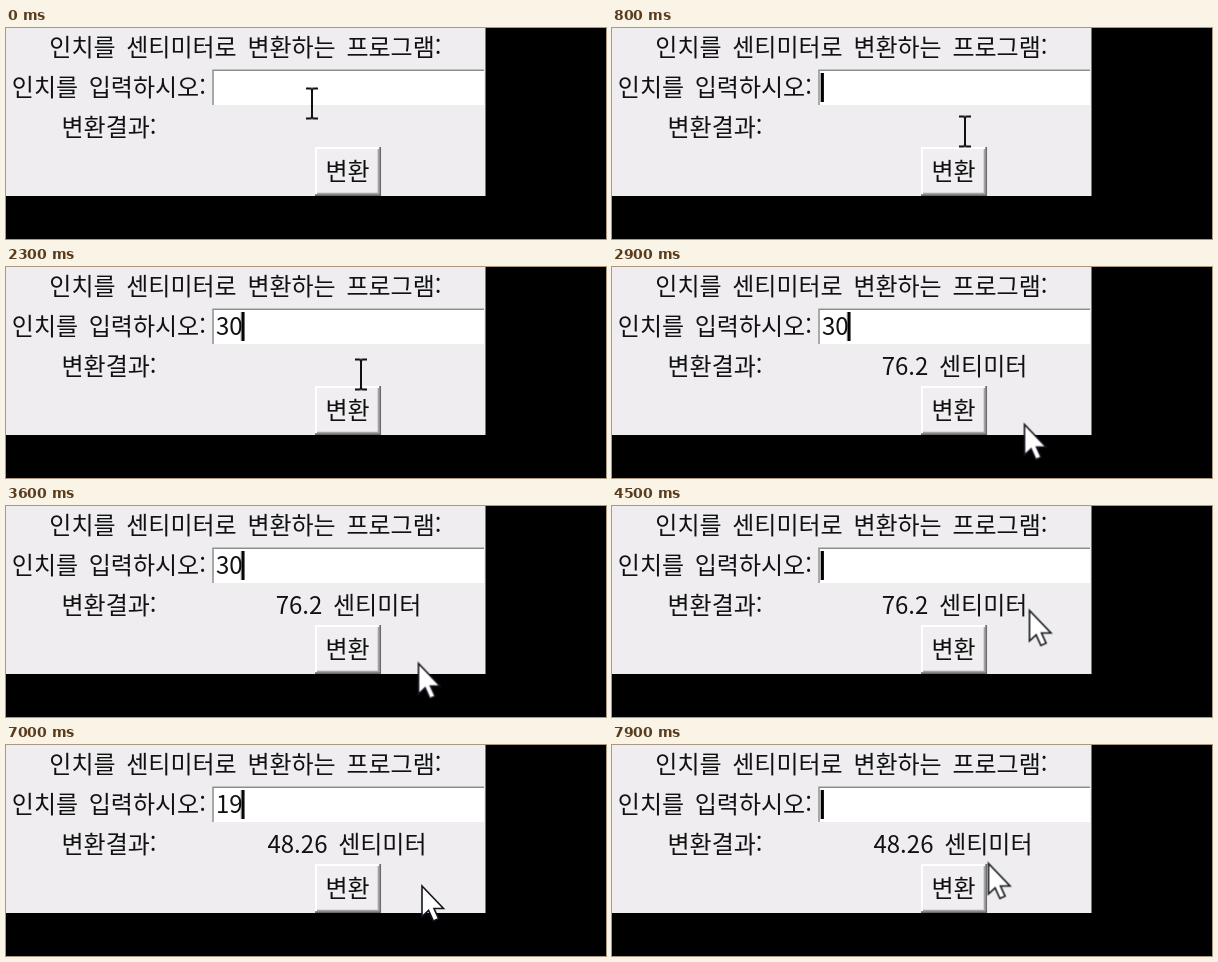
Recreate the animation shown at these times as an HTML page. Size 600x211 px, loop 8000 ms.

```html
<!DOCTYPE html>
<html lang="ko">
<head>
<meta charset="utf-8">
<title>단위 변환</title>
<style>
html, body { margin: 0; width: 100%; height: 100%; overflow: hidden; background: #000; }
svg { display: block; width: 600px; height: 211px; }
text {
  font: 24px "Noto Sans CJK KR", "Noto Sans CJK", "Noto Sans CJK JP", sans-serif;
  word-spacing: 4px;
  fill: #111;
  white-space: pre;
}
.mid { text-anchor: middle; }

/* Everything shares one 8 s clock; 1% = 80 ms */
.anim { animation: 8s step-end infinite; }
.three { animation-name: three; }
.zero { animation-name: zero; }
.one { animation-name: one; }
.nine { animation-name: nine; }
.first { animation-name: first; }
.second { animation-name: second; }
.caret { animation-name: caret; }
.beam { animation-name: beam; }
.arrow { animation-name: arrow; }
.pointer { animation-name: move; }

@keyframes three {
  0%, 53.75%, 100% { visibility: hidden; }
  18.75% { visibility: visible; }
}
@keyframes zero {
  0%, 51.25%, 100% { visibility: hidden; }
  22.5% { visibility: visible; }
}
@keyframes one {
  0%, 91.25%, 100% { visibility: hidden; }
  65% { visibility: visible; }
}
@keyframes nine {
  0%, 88.75%, 100% { visibility: hidden; }
  68.75% { visibility: visible; }
}
@keyframes first {
  0%, 77.5%, 100% { visibility: hidden; }
  31.25% { visibility: visible; }
}
@keyframes second {
  0% { visibility: hidden; }
  77.5%, 100% { visibility: visible; }
}
@keyframes caret {
  0% { visibility: hidden; transform: translate(0, 0); }
  5%, 53.75%, 91.25%, 100% { visibility: visible; transform: translate(0, 0); }
  18.75%, 51.25%, 65%, 88.75% { visibility: visible; transform: translate(13.3px, 0); }
  22.5%, 68.75% { visibility: visible; transform: translate(26.6px, 0); }
}
@keyframes beam {
  0% { visibility: visible; }
  30%, 100% { visibility: hidden; }
}
@keyframes arrow {
  0% { visibility: hidden; }
  30%, 100% { visibility: visible; }
}
@keyframes move {
  0% { transform: translate(306px, 75.5px); }
  3.75% { transform: translate(306px, 75.5px); animation-timing-function: steps(5); }
  10% { transform: translate(353px, 103.5px); }
  13.75% { transform: translate(353px, 103.5px); animation-timing-function: steps(4); }
  18.75% { transform: translate(355px, 107.5px); }
  30% { transform: translate(350px, 128px); }
  31.25% { transform: translate(347px, 140px); animation-timing-function: steps(2); }
  33.75% { transform: translate(411.5px, 156.5px); }
  47.5% { transform: translate(411.5px, 156.5px); animation-timing-function: steps(5); }
  53.75% { transform: translate(416.5px, 103.5px); }
  75% { transform: translate(416.5px, 103.5px); animation-timing-function: steps(2); }
  77.5% { transform: translate(350px, 142px); }
  78.75% { transform: translate(408px, 173px); }
  83.75% { transform: translate(408px, 173px); animation-timing-function: steps(3); }
  87.5% { transform: translate(415px, 140px); animation-timing-function: steps(3); }
  91.25%, 100% { transform: translate(375.5px, 117.5px); }
}
</style>
</head>
<body>
<svg viewBox="0 0 600 211">
  <rect width="600" height="211"/>
  <rect width="479.5" height="168" fill="#efedf0"/>

  <!-- entry field -->
  <rect x="206" y="41.5" width="272" height="35.5" fill="#fff"/>
  <path d="M207 77V42.2H478" fill="none" stroke="#8d8c8e" stroke-width="1.5"/>

  <!-- button -->
  <rect x="309" y="119" width="66" height="49" fill="#f0eef0"/>
  <path d="M310 167V120H373" fill="none" stroke="#fff" stroke-width="2"/>
  <path d="M372.5 121V165.5H311" fill="none" stroke="#a3a2a4" stroke-width="1.6"/>
  <path d="M374.2 119V167.1H309" fill="none" stroke="#6c6b6e" stroke-width="1.7"/>

  <text x="43.3" y="28">인치를 센티미터로 변환하는 프로그램:</text>
  <text x="5.8" y="68">인치를 입력하시오:</text>
  <text x="55.5" y="108">변환결과:</text>
  <text class="mid" x="341.5" y="152">변환</text>

  <text x="210" y="68"><tspan class="anim three">3</tspan><tspan class="anim zero">0</tspan></text>
  <text x="210" y="68"><tspan class="anim one">1</tspan><tspan class="anim nine">9</tspan></text>
  <rect class="anim caret" x="208.7" y="45" width="3.2" height="29"/>

  <text class="mid anim first" x="342.5" y="108">76.2 센티미터</text>
  <text class="mid anim second" x="341" y="108">48.26 센티미터</text>

  <g class="anim pointer">
    <path class="anim beam" d="M-6 -15H-2Q0 -15 0 -13Q0 -15 2 -15H6M0 -13V13M-6 15H-2Q0 15 0 13Q0 15 2 15H6" fill="none" stroke="#111" stroke-width="2"/>
    <path class="anim arrow" d="M1 1V31.5L7.6 25.4L12.4 36L17.6 33.7L13 23.5H22.5Z" fill="#fff" stroke="#15151f" stroke-width="1.6"/>
  </g>
</svg>
</body>
</html>
```
